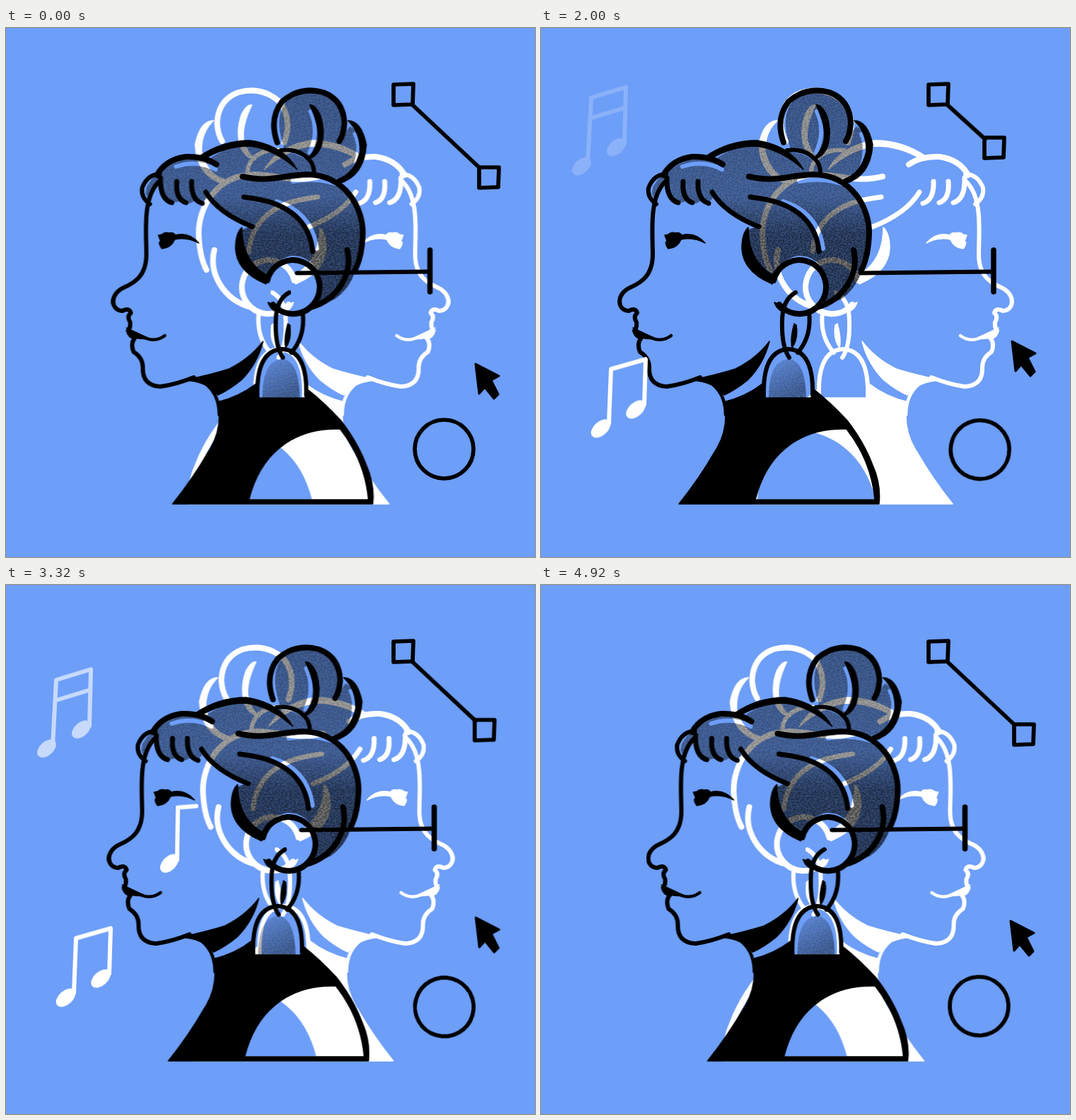
An HTML page without scripts that plays this animation: 748 px wide and 748 px high, repeating every 4.96 s.

```html
<!DOCTYPE html>
<html lang="en">
<head>
<meta charset="utf-8">
<title>Two profiles</title>
<style>
  html, body { margin: 0; height: 100%; overflow: hidden; background: #6d9ef8; }
  svg { display: block; width: 100vw; height: 100vh; }
  path, line, circle, rect { stroke-linecap: round; stroke-linejoin: round; }

  .line { fill: none; stroke: currentColor; stroke-width: 8; }
  .mid { stroke-width: 7; }
  .thin { stroke-width: 6; }
  .fine { stroke-width: 4.5; }
  .ink { fill: currentColor; stroke: currentColor; stroke-width: 1.5; }
  .tool { fill: none; stroke: #000; stroke-width: 5.7; }

  /* Shared back-and-forth move: out, hold, back, hold */
  .slide, .node, .link, .cursor {
    animation: shift 4960ms cubic-bezier(.58, 0, .4, 1) infinite;
  }
  .slide { --rest: translate(40.5px, 0); --moved: none; }
  .node { --rest: none; --moved: translate(-42px, -42px); }
  .link {
    --rest: scale(1); --moved: scale(.5625, .545);
    transform-origin: 574px 108px; vector-effect: non-scaling-stroke;
  }
  .cursor { --rest: none; --moved: translate(2px, -32px); }
  @keyframes shift {
    0%, 75%, 100% { transform: var(--rest); }
    25%, 50% { transform: var(--moved); }
  }

  .ring { transform-origin: 620px 596px; animation: spin 4960ms linear infinite; }
  @keyframes spin { to { transform: rotate(360deg); } }

  .note {
    color: #fff;
    animation: rise 4960ms var(--ease) infinite, var(--fade) 4960ms linear infinite;
    animation-delay: calc(var(--at) - 4960ms);
  }
  .pair { --from: 42.5px; --to: -8.5px; --ease: cubic-bezier(.3, .3, .5, 1); --fade: fade-slow; }
  .duo { --from: 16.5px; --to: -19px; --ease: cubic-bezier(.3, .3, .5, 1); --fade: fade-long; }
  .solo { --from: 50px; --to: -1px; --ease: cubic-bezier(.18, .4, .27, 1); --fade: fade-short; }
  @keyframes rise {
    0% { transform: translateY(var(--from)); }
    39%, 100% { transform: translateY(var(--to)); }
  }
  @keyframes fade-slow { 0%, 40%, 100% { opacity: 0; } 14%, 32% { opacity: 1; } }
  @keyframes fade-long { 0%, 40%, 100% { opacity: 0; } 9%, 33% { opacity: 1; } }
  @keyframes fade-short { 0%, 34%, 100% { opacity: 0; } 9%, 26% { opacity: 1; } }
</style>
</head>
<body>
<svg viewBox="0 0 748 748">
  <defs>
    <filter id="grain" color-interpolation-filters="sRGB">
      <feTurbulence type="fractalNoise" baseFrequency=".45" numOctaves="2" seed="4"/>
      <feColorMatrix values="0 0 0 0 0  0 0 0 0 0  0 0 0 0 0  0 0 0 7 -3"/>
      <feComposite in="SourceGraphic" operator="arithmetic" k1=".28" k2=".86"/>
    </filter>
    <linearGradient id="shade" gradientUnits="userSpaceOnUse" x1="0" y1="85" x2="0" y2="390">
      <stop offset="0" stop-opacity=".46"/>
      <stop offset=".5" stop-opacity=".41"/>
      <stop offset=".68" stop-opacity=".63"/>
      <stop offset="1" stop-opacity=".63"/>
    </linearGradient>
    <linearGradient id="tagShade" x1="0" y1="0" x2=".5" y2="1">
      <stop offset="0" stop-opacity=".12"/>
      <stop offset="1" stop-opacity=".42"/>
    </linearGradient>
    <mask id="shine" maskUnits="userSpaceOnUse" x="100" y="60" width="420" height="360">
      <rect x="100" y="60" width="420" height="360" fill="#fff"/>
      <g fill="none" stroke="#000" stroke-width="6">
        <path d="M200 196Q230 186 256 200"/>
        <path d="M365 217Q405 209 440 226"/>
        <path d="M342 245Q392 260 399 312"/>
        <path d="M390 118Q403 145 389 176"/>
        <path d="M453 150Q464 170 450 206"/>
      </g>
    </mask>

    <g id="shading">
      <g filter="url(#grain)">
        <g fill="url(#shade)" mask="url(#shine)">
          <path d="M160 222Q170 205 190 195Q215 180 245 187Q275 162 320 166Q340 168 350 176Q385 175 397 207Q445 218 460 260Q468 300 455 335Q450 365 425 383Q412 390 398 391Q408 370 402 350Q392 322 364 322Q340 325 330 357Q293 340 290 286L305 281Q262 265 243 240Q235 252 225 245Q215 252 205 245Q190 250 183 240Q178 228 176 217Q166 234 160 241Q154 232 160 222Z"/>
          <path d="M352 167Q338 125 356 104Q385 82 420 100Q442 120 434 153L446 139Q466 150 462 180Q448 212 425 213Q408 206 397 206Q385 176 352 173Z"/>
        </g>
        <path fill="url(#tagShade)" d="M322 523Q322 470 350 468Q374 470 375 523Z"/>
      </g>
    </g>

    <g id="profile">
      <!-- face -->
      <path class="line thin" d="M176 217C152 240 158 290 158 320C158 350 142 360 126 367C106 376 107 399 124 400Q134 395 136 403Q130 408 135 416Q136 424 132 428Q134 436 142 438Q135 446 140 458Q153 466 153 480Q152 506 178 507Q200 504 225 494"/>
      <path class="line fine" d="M132 427Q147 434 158 439Q172 444 184 435"/>
      <path class="ink" d="M130 424Q148 433 162 439Q145 441 134 434Z"/>
      <path class="ink" d="M175 293L180 292Q184 288 190 290Q196 288 199 293Q218 288 232 304Q215 295 198 299Q193 311 180 312Q174 304 178 301Z"/>

      <!-- neck and shoulders -->
      <path class="ink" d="M212 498Q250 490 275 482Q305 467 323 443Q315 475 292 498Q275 512 259 519Q245 500 212 498Z"/>
      <path class="line fine" d="M236 499Q261 514 261 547"/>
      <path class="ink" fill-rule="evenodd" d="M195 673Q225 635 245 600Q262 575 261 545Q262 533 258 529Q290 521 313 503L315 523H382L386 511Q409 529 433 555Q457 586 469 618Q481 645 478 673Z
        M303 667H472Q467 612 432 567Q380 565 345 595Q315 620 303 667Z"/>

      <!-- fringe -->
      <path class="line thin" d="M177 207Q160 206 152 226Q150 240 163 249"/>
      <path class="line" d="M173 208Q185 186 214 182Q240 181 257 193"/>
      <path class="line mid" d="M178 212Q177 242 194 247M201 217Q199 242 214 247M222 217Q221 243 237 248M242 232Q260 262 308 281"/>
      <path class="ink" d="M232 182Q265 159 305 159Q352 166 371 200Q340 172 305 167Q270 167 240 185Z"/>

      <!-- wrapped hair -->
      <path class="line" d="M294 210C332 219 350 208 385 207C440 208 465 255 464 292C463 318 458 333 453 342"/>
      <path class="line mid" d="M296 239C330 243 350 250 368 265C385 280 392 300 393 316"/>
      <path class="ink" d="M293 282Q293 330 329 350L327 362Q286 345 284 312Q284 290 293 282Z"/>
      <path class="line" d="M442 314C450 346 430 384 390 395"/>

      <!-- bun -->
      <path class="line" d="M343 162Q331 128 350 104Q375 82 408 91Q437 102 438 135Q437 150 431 160"/>
      <path class="ink" d="M389 109Q395 107 403 121Q412 145 405 168Q398 184 384 186Q396 176 400 160Q404 140 389 109Z"/>
      <path class="ink" d="M443 131Q462 131 469 165Q466 210 430 220Q425 217 428 214Q452 207 460 175Q461 148 443 131Z"/>
      <path class="line thin" d="M348 173Q374 170 388 186Q395 194 395 204"/>

      <!-- earring -->
      <path class="line" d="M329 357A37.5 38 0 1 1 337 391"/>
      <path class="ink" d="M330 388Q340 390 348 402Q335 402 330 388Z"/>
      <path class="line thin" d="M360 374Q341 384 341 415Q340 450 351 466M379 402Q383 436 363 459"/>
      <path class="ink" d="M358 418Q352 440 355 452Q364 440 361 420Z"/>
      <path class="line thin" d="M315 521Q313 456 350 454Q386 456 384 519"/>
    </g>

    <g id="pair">
      <path class="line thin" d="M66 200L71 107L120 92L118 172M70 136L119 121"/>
      <ellipse class="ink" rx="15" ry="9" transform="translate(57.5 204) rotate(-42)"/>
      <ellipse class="ink" rx="15" ry="9" transform="translate(106.5 177) rotate(-42)"/>
    </g>
    <g id="duo">
      <path class="line thin" d="M96 575L99 498L148 484L146 548"/>
      <ellipse class="ink" rx="15.5" ry="9" transform="translate(84.5 582) rotate(-42)"/>
      <ellipse class="ink" rx="15.5" ry="9" transform="translate(134 555) rotate(-42)"/>
    </g>
    <g id="solo">
      <path class="line thin" d="M242 380L243 306L269 304"/>
      <ellipse class="ink" rx="15" ry="9" transform="translate(231 385) rotate(-46)"/>
    </g>
  </defs>

  <rect width="748" height="748" fill="#6d9ef8"/>

  <g transform="matrix(-1 0 0 1 777 0)">
    <use class="slide" href="#profile" color="#fff"/>
  </g>
  <g class="slide">
    <use href="#shading"/>
    <use href="#profile" color="#000"/>
  </g>

  <!-- drawing tools -->
  <g transform="matrix(-1 0 0 1 777 0)">
    <g class="slide tool">
      <path stroke-width="6" d="M325 346.5L137 344.5"/>
      <path stroke-width="7.5" d="M137 314V373"/>
    </g>
  </g>
  <g class="tool">
    <path d="M548 80L576 79L575 108L548 109Z"/>
    <line class="link" x1="574" y1="108" x2="670" y2="198"/>
    <path class="node" d="M669 197L697 197L696 225L669 226Z"/>
    <circle class="ring" cx="619.5" cy="595.5" r="41.5"/>
  </g>
  <path class="cursor" d="M664 475L697 492L686 498L696 518L690 524L677 508L669 517Z" stroke="#000" stroke-width="3"/>

  <!-- rising notes -->
  <use class="note pair" href="#pair" style="--at:100ms"/>
  <use class="note pair" href="#pair" style="--at:2890ms"/>
  <use class="note duo" href="#duo" style="--at:640ms"/>
  <use class="note duo" href="#duo" style="--at:2740ms"/>
  <use class="note solo" href="#solo" style="--at:0ms"/>
  <use class="note solo" href="#solo" style="--at:2480ms"/>
</svg>
</body>
</html>
```
